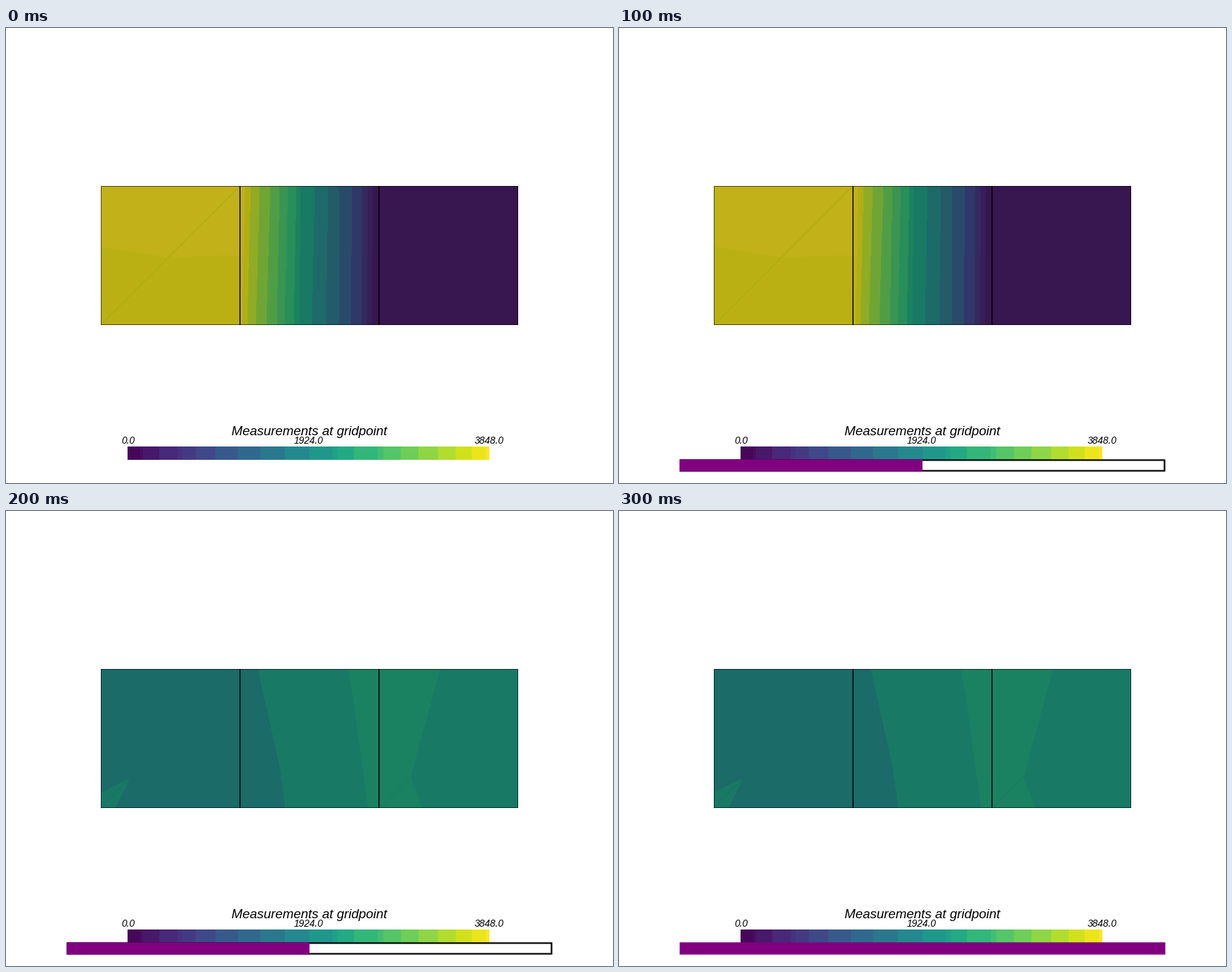
Write a matplotlib script that moves like this. It is 864 px wide and 648 px high and loops after 400 ms.

```python
import matplotlib.pyplot as plt
from matplotlib.animation import FuncAnimation
from matplotlib.patches import Polygon, Rectangle

W, H, DPI = 864, 648, 72
X0, X1, X2, X3 = 135, 333, 531, 729
TOP, BOTTOM = 225, 423

fig = plt.figure(figsize=(W / DPI, H / DPI), dpi=DPI, facecolor="white")
ax = fig.add_axes([0, 0, 1, 1])
ax.set_xlim(0, W)
ax.set_ylim(H, 0)
ax.axis("off")


def rect(x0, y0, x1, y1, color, z=1, smooth=False):
    return ax.add_patch(Rectangle((x0, y0), x1 - x0, y1 - y0, fc=color,
                                  lw=0, antialiased=smooth, snap=False,
                                  zorder=z))


def poly(points, color, z=1):
    return ax.add_patch(Polygon(points, closed=True, fc=color, lw=0,
                                antialiased=False, zorder=z))


def line(xs, ys, color, lw=1.0, alpha=1.0, z=2):
    return ax.plot(xs, ys, color=color, lw=lw, alpha=alpha, zorder=z,
                   snap=False, solid_capstyle="butt",
                   solid_joinstyle="miter")[0]


def label(x, y, text, size):
    ax.text(x, y, text, fontsize=size, family="Liberation Sans",
            style="italic", color="black", ha="center", va="baseline",
            zorder=6)


def gradient_field():
    """High values on the left falling to zero on the right."""
    tops = [333, 341, 349, 362, 377, 390, 402, 414, 420, 440, 459, 475,
            493, 508, 516, 523]
    bottoms = [333, 337, 344, 356, 371, 386, 397, 410, 418, 436, 456, 474,
               491, 506, 514, 521]
    colors = ["#c0b017", "#b0af15", "#90ab24", "#70a535", "#4f9e46",
              "#3a9552", "#288f5b", "#1b8261", "#187a65", "#1c6b68",
              "#235b69", "#294b69", "#313869", "#352a60", "#371f58",
              "#381650"]
    parts = [
        rect(X0, TOP, X1, BOTTOM, "#c2b119"),
        poly([(X0, 312), (230, 327), (X1, 324), (X1, BOTTOM),
              (X0, BOTTOM)], "#bab014"),
        line([X0, X1], [BOTTOM, TOP], "#a9ac17", 1.1),
    ]
    # each band runs to the right edge and is covered by the next
    for a, b, color in zip(tops, bottoms, colors):
        parts.append(poly([(a, TOP), (X3, TOP), (X3, BOTTOM), (b, BOTTOM)],
                          color))
    return parts


def even_field():
    """Middle values over all three cells."""
    low, mid, high = "#1b6b68", "#187a65", "#1b8261"
    return [
        rect(X0, TOP, X3, BOTTOM, low),
        poly([(X0, 402), (176, 381), (155, BOTTOM), (X0, BOTTOM)], mid),
        line([X0, 176], [BOTTOM, 381], "#1b7067", 1.1),
        poly([(359, TOP), (390, 364), (398, BOTTOM), (X3, BOTTOM),
              (X3, TOP)], mid),
        poly([(487, TOP), (494, 261), (516, BOTTOM), (592, BOTTOM),
              (575, 380), (617, TOP)], high),
        line([X2, 575], [BOTTOM, 380], "#197b64", 1.1),
    ]


def color_bar():
    edges = [173, 191, 195, 218, 244, 251, 270, 298, 330, 362, 397, 432,
             465, 472, 495, 529, 537, 562, 587, 615, 640, 663, 683, 688]
    start, span = edges[0], edges[-1] - edges[0]
    for a, b in zip(edges, edges[1:]):
        rect(a, 596, b, 615, plt.cm.viridis(((a + b) / 2 - start) / span))
    label(432, 579.5, "Measurements at gridpoint", 18.8)
    for x, value in ((173.5, 0), (431, 1924), (687.8, 3848)):
        label(x, 591.5, f"{value:.1f}", 13.8)


fields = [gradient_field(), even_field()]

# cell edges
left, right, top, bottom = X0 + .5, X3 - .5, TOP + .5, BOTTOM - .5
line([left, right, right, left, left], [top, top, bottom, bottom, top],
     "black", 1, 0.6, 3)
for x in (X1 + .1, X2 - .1):
    line([x, x], [TOP, BOTTOM], "black", 1.5, 1, 3)

color_bar()

# progress bar spans the middle 80 % of the stage
BAR_X, BAR_W, BAR_TOP, BAR_BOTTOM, EDGE = 0.1 * W, 0.8 * W, 614.3, 631.7, 2.2
bar_end = BAR_X + BAR_W
border = rect(BAR_X, BAR_TOP, bar_end, BAR_BOTTOM, "black", 4, True)
inside = rect(BAR_X + EDGE, BAR_TOP + EDGE, bar_end - EDGE,
              BAR_BOTTOM - EDGE, "white", 4, True)
fill = rect(BAR_X, BAR_TOP, BAR_X, BAR_BOTTOM, "#800080", 5, True)


def update(i):
    step = i // 2              # the field follows every second tick
    done = (i + 1) // 2 / 2    # the bar fills by halves in between
    for k, parts in enumerate(fields):
        for part in parts:
            part.set_visible(k == step)
    for part in (border, inside):
        part.set_visible(0 < done < 1)
    fill.set_visible(done > 0)
    fill.set_width(BAR_W * done)
    return []


anim = FuncAnimation(fig, update, frames=4, interval=100, repeat=True,
                     repeat_delay=0, init_func=lambda: update(0))
plt.show()
```
